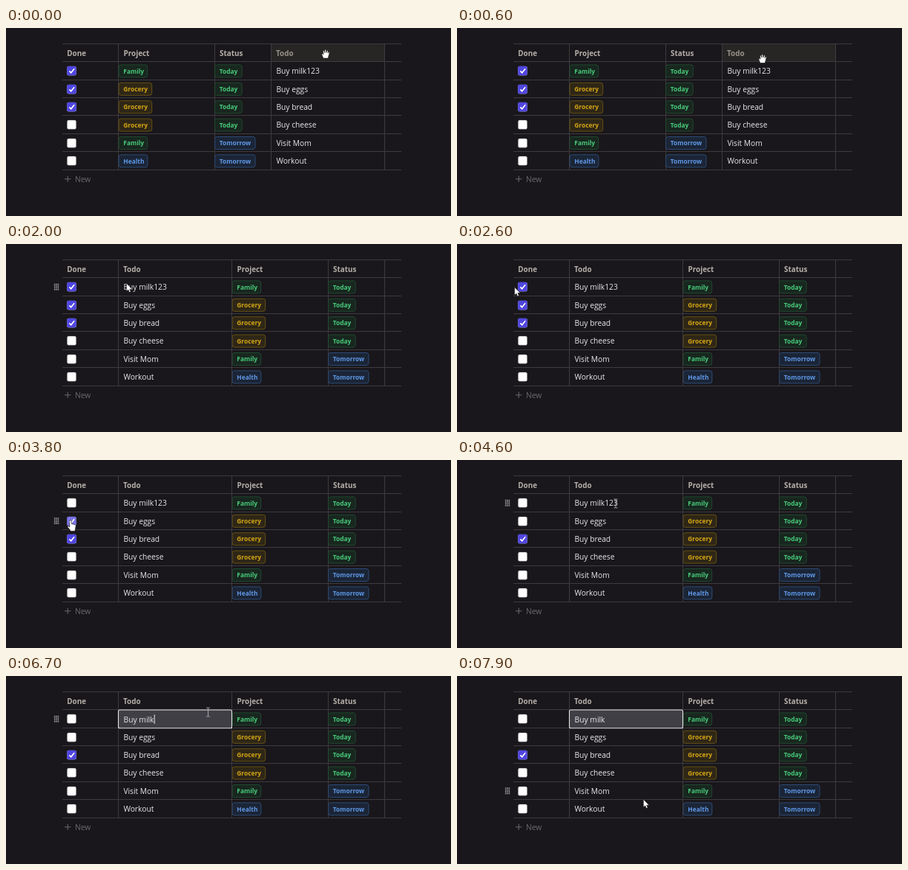
These frames come from a looping animation (600x255 px, 8000 ms). An HTML page:

```html
<!DOCTYPE html>
<html lang="en">
<head>
<meta charset="utf-8">
<title>Todo table</title>
<style>
  html, body { margin: 0; width: 100%; height: 100%; overflow: hidden; background: #19171b; }
  svg { display: block; width: 600px; height: 255px; }
  text { font-family: "Open Sans", "Noto Sans", sans-serif; font-size: 10.25px; fill: #e8e7e9; white-space: pre; }
  .head { font-size: 9.9px; font-weight: 700; fill: #b5afa9; }
  .tag { font-size: 8.4px; font-weight: 700; }
  .new { fill: #6b696c; }
</style>
</head>
<body>
<svg id="stage" viewBox="0 0 600 255"></svg>
<script>
const LOOP = 8000, STEP = 100;
const ROW = 24.4, TOP = 45.8, BOTTOM = 192, LINE = '#3d3b3e';
const stage = document.getElementById('stage');

function add(parent, name, attrs = {}, text) {
  const el = document.createElementNS('http://www.w3.org/2000/svg', name);
  for (const k in attrs) el.setAttribute(k, attrs[k]);
  if (text !== undefined) el.textContent = text;
  parent.appendChild(el);
  return el;
}
const rect = (p, x, y, width, height, fill, more) => add(p, 'rect', { x, y, width, height, fill, ...more });
const label = (p, x, y, text, cls, more) => add(p, 'text', { x, y, class: cls, ...more }, text);
const center = row => TOP + 12.6 + ROW * row;
const shift = (el, x, y = 0) => el.setAttribute('transform', `translate(${x} ${y})`);
const show = (el, on) => el.setAttribute('visibility', on ? 'visible' : 'hidden');

const green = ['#48cb7b', '#18271f', '#20482f'];
const yellow = ['#d6a616', '#2f2716', '#665014'];
const blue = ['#5f98e8', '#1b2536', '#2d4a76'];
const tags = {
  Family: [38.6, green], Grocery: [44.6, yellow], Health: [38.8, blue],
  Today: [36.6, green], Tomorrow: [54.4, blue]
};
const rows = [
  ['Family', 'Today', 'Buy milk123'],
  ['Grocery', 'Today', 'Buy eggs'],
  ['Grocery', 'Today', 'Buy bread'],
  ['Grocery', 'Today', 'Buy cheese'],
  ['Family', 'Tomorrow', 'Visit Mom'],
  ['Health', 'Tomorrow', 'Workout']
];

// Grid
for (let i = -1; i < 7; i++) rect(stage, 76, Math.floor(TOP + ROW * i), 457, 1, LINE);
rect(stage, 151, 22, 1, BOTTOM - 22, LINE);
label(stage, 82.3, 37.8, 'Done', 'head');
add(stage, 'path', { d: 'M79 204.8h8.4M83.2 200.6v8.4', stroke: '#6b696c', 'stroke-width': 1 });
label(stage, 93, 209, 'New', 'new');

// Columns, each with its right border
const columns = [['Project', 151.5, 281], ['Status', 281, 357], ['Todo', 357, 510]].map(([name, left, right], i) => {
  const head = add(stage, 'g'), body = add(stage, 'g');
  const hover = rect(head, left + 1, 22, right - left - 1, 23, '#272625', { visibility: 'hidden' });
  const title = label(head, left + 7.1, 37.8, name, 'head');
  rect(head, right, 22, 1, 23, LINE);
  rect(body, right, 46, 1, BOTTOM - 46, LINE);
  const cells = rows.map((row, r) => {
    const text = row[i], y = center(r);
    if (i === 2) return label(body, left + 7.4, y + 3.8, text);
    const [w, [ink, fill, stroke]] = tags[text];
    rect(body, left + 0.6, y - 8.5, w, 17, fill, { rx: 3, stroke, 'stroke-width': 1 });
    return label(body, left + 6.8, y + 3.1, text, 'tag', { style: `fill:${ink}` });
  });
  return { head, body, hover, title, cells };
});
const [project, status, todo] = columns;

const boxes = rows.map((_, r) => {
  const y = Math.round(center(r) - 6.3);
  rect(stage, 82.4, y, 12.2, 12.2, '#fff', { rx: 2, stroke: '#77757a', 'stroke-width': 0.4 });
  const on = add(stage, 'g');
  rect(on, 82.2, y - 0.2, 12.5, 12.5, '#4f46e0', { rx: 2.2 });
  add(on, 'path', { d: `M85.4 ${y + 6.3}l2.3 2.5 4.4-5.6`, fill: 'none', stroke: '#fff', 'stroke-width': 1.7 });
  return on;
});

// Row drag handle
const grip = add(stage, 'g');
for (let i = 0; i < 12; i++) rect(grip, 64.9 + i % 3 * 2.4, -4.5 + Math.floor(i / 3) * 2.4, 1.5, 1.5, '#b0aeb2');

// Cell editor
const editor = add(stage, 'g');
rect(editor, 151.5, 46, 153, 24.8, '#403f46', { rx: 2, stroke: '#e4e4e6', 'stroke-width': 1.1 });
const field = label(editor, 158.6, center(0) + 4.1, 'Buy milk123');
const caret = rect(editor, 0, 52.3, 1, 12.6, '#e8e8ea');

const outline = { fill: '#fff', stroke: '#111', 'stroke-width': 0.6, 'stroke-linejoin': 'round' };
const shapes = {
  grab: 'M-3.2 6L-5 1.5Q-5.6-.4-4.2-.6L-3 .8L-3.6-3.6Q-3.4-5-2.2-4.4L-1.4-1.4L-1.2-5.2Q-.4-6.3 .5-5.2L.8-1.6L1.7-4.6Q2.8-5.3 3.2-4.2L3-1L4.2-2.6Q5.3-2.8 5.2-1.6L4 3L3.2 6Z',
  arrow: 'M0 0V10.8L2.4 8.6L4 12.2L5.9 11.3L4.4 7.9H7.7Z',
  hand: 'M-1.5 1Q-1.5-.4-.2-.4Q1-.4 1 1V4.6L5.6 5.6Q7 6 6.9 7.4L6.2 11.5L5.4 14.5H-.4L-1 12.8L-4.2 9Q-4.8 7.6-3.4 7.4L-1.5 9Z',
  beam: 'M-2.4-6H-.6L0-5.4L.6-6H2.4M0-5.4V5.4M-2.4 6H-.6L0 5.4L.6 6H2.4'
};
const pointer = add(stage, 'g');
const cursors = {};
for (const k in shapes) {
  const look = k === 'beam' ? { fill: 'none', stroke: '#b4b3b8', 'stroke-width': 0.9 } : outline;
  cursors[k] = add(pointer, 'path', { d: shapes[k], ...look });
}

// time, x, y, shape
const path = [
  [0, 431, 35, 'grab'], [600, 412, 41.5, 'grab'], [800, 375, 48, 'grab'],
  [900, 345, 51, 'arrow'], [1200, 250, 53, 'arrow'], [1400, 217, 51, 'arrow'], [1500, 215.5, 51, 'arrow'],
  [1800, 213, 51, 'arrow'], [2400, 61, 58, 'arrow'], [2500, 61, 58, 'arrow'], [2600, 77.6, 58.6, 'arrow'],
  [2700, 85, 59, 'hand'], [3000, 86, 60, 'hand'], [3400, 87, 75, 'hand'], [3500, 87.3, 82, 'hand'],
  [3800, 87.3, 82, 'hand'], [3900, 96, 80, 'arrow'], [4200, 160, 68, 'beam'], [4600, 214, 59, 'beam'],
  [5300, 214, 59, 'beam'], [5500, 272.5, 49, 'beam'], [7500, 272.5, 49, 'beam'],
  [7600, 315, 38, 'arrow'], [7700, 360, 80, 'arrow'], [7800, 310, 140, 'arrow'], [7900, 251.3, 167.3, 'arrow']
];
const dragPath = [[600, 0], [700, -25], [800, -58], [900, -90], [1200, -185], [1400, -219], [1500, -221], [1800, -206]];
const statusPath = [[700, 0], [900, 153]];
const projectPath = [[1000, 0], [1200, 153]];
const gripSteps = [[0, -1], [900, 0], [2400, -1], [2700, 0], [3300, 1], [4100, 0], [7700, 1], [7800, 3], [7900, 4]];
const textSteps = [[0, 'Buy milk123'], [6300, 'Buy milk12'], [6500, 'Buy milk1'], [6600, 'Buy milk']];

const last = (steps, t) => steps.filter(s => s[0] <= t).pop();
function lerp(keys, t, i = 1) {
  const n = keys.findIndex(k => k[0] > t);
  if (n === 0) return keys[0][i];
  if (n < 0) return keys[keys.length - 1][i];
  const a = keys[n - 1], b = keys[n];
  return a[i] + (b[i] - a[i]) * (t - a[0]) / (b[0] - a[0]);
}

function draw(t) {
  const moved = t >= 1900;
  shift(project.head, lerp(projectPath, t));
  shift(status.head, lerp(statusPath, t));
  shift(todo.head, lerp(dragPath, t));
  shift(project.body, moved ? 153 : 0);
  shift(status.body, moved ? 153 : 0);
  shift(todo.body, moved ? -206 : 0);
  show(todo.hover, t < 900);
  todo.title.style.fill = t < 900 ? '#989289' : '';

  const checked = [t < 2900 ? 1 : 0, t < 3800 ? 1 : t < 3900 ? 0.75 : 0, 1, 0, 0, 0];
  boxes.forEach((box, i) => box.setAttribute('opacity', checked[i]));

  const row = last(gripSteps, t)[1];
  show(grip, row >= 0);
  shift(grip, 0, center(row));

  const editing = t >= 5000;
  editor.setAttribute('display', editing ? 'inline' : 'none');
  show(todo.cells[0], !editing);
  if (editing) {
    field.textContent = last(textSteps, t)[1];
    caret.setAttribute('x', 158.8 + field.getComputedTextLength());
    show(caret, t >= 6000 && t < 7100);
  }

  shift(pointer, lerp(path, t, 1), lerp(path, t, 2));
  const kind = last(path, t)[3];
  for (const k in cursors) show(cursors[k], k === kind);
}

const start = performance.now();
function tick() {
  const t = (performance.now() - start) % LOOP;
  draw(Math.floor(t / STEP) * STEP);
  requestAnimationFrame(tick);
}
tick();
</script>
</body>
</html>
```
